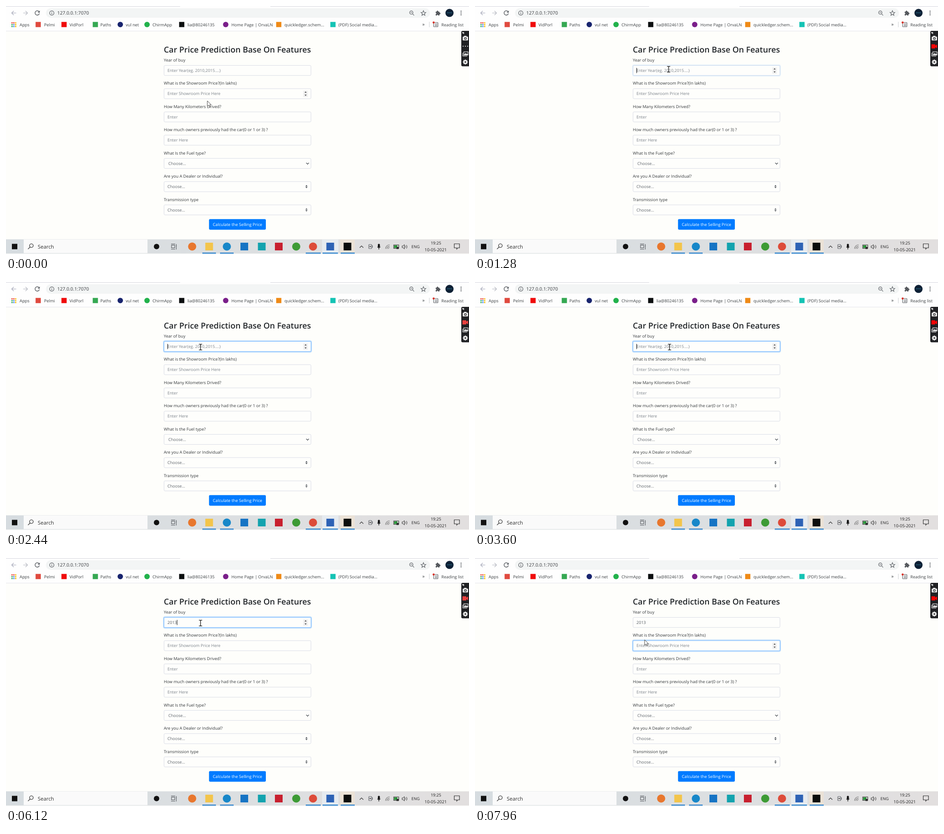
An HTML page that plays this animation: 1021x549 px, repeating every 8 s.

```html
<!DOCTYPE html>
<html lang="en">
<head>
<meta charset="utf-8">
<title>Car price form</title>
<style>
html, body { margin: 0; width: 100%; height: 100%; overflow: hidden; background: #fefefb; }
svg {
  display: block; width: 100%; height: 100%;
  font-family: "Open Sans", "Noto Sans", sans-serif; text-rendering: geometricPrecision;
}
.line { fill: none; stroke: #5f6368; stroke-width: 1.2; }
</style>
</head>
<body>
<svg id="stage" viewBox="0 0 1021 549"></svg>
<script>
const LOOP = 8000;
const STEP = 51.45; // distance between form rows
const FONT = 9.08;

const text = (x, y, size, fill, content, extra = '') =>
  `<text x="${x}" y="${y}" font-size="${size}" fill="${fill}" ${extra}>${content}</text>`;
const rect = (x, y, w, h, fill, extra = '') =>
  `<rect x="${x}" y="${y}" width="${w}" height="${h}" fill="${fill}" ${extra}/>`;
const circle = (x, y, r, fill, extra = '') =>
  `<circle cx="${x}" cy="${y}" r="${r}" fill="${fill}" ${extra}/>`;
const line = (d, extra = '') => `<path class="line" d="${d}" ${extra}/>`;
const shape = (d, fill, extra = '') => `<path d="${d}" fill="${fill}" ${extra}/>`;
const square = (x, y, size, fill) => rect(x - size / 2, y - size / 2, size, size, fill);

function browserBar() {
  const bookmarks = [
    [84, 'Pelmi', 71, '#e04a3f', square],
    [140, 'VidPorl', 128, '#f00a0a', square],
    [208, 'Paths', 197, '#36a853', square],
    [264, 'vul net', 252, '#18246e', circle],
    [323, 'ChirmApp', 311, '#22b24c', circle],
    [400, 'lia@80246135', 387.5, '#0c0f10', square],
    [497, 'Home Page | OrvaLN', 484.5, '#7a1f8a', circle],
    [614, 'quickledger.schem...', 601.5, '#ef8a17', square],
    [733, '(PDF) Social media...', 721, '#14c3b4', square],
  ];
  let out = rect(0, 0, 1021, 55, '#fefefe')
    + rect(0, 0, 384, 1.3, '#dcdde3') + rect(583, 0, 438, 1.3, '#dcdde3')
    + rect(0, 55, 1021, 1, '#e4e4ea')
    + rect(88, 5, 847, 21, '#f3f5f5', 'rx="10.5"');
  out += line('M22.5 15.5H13M17 11l-4.5 4.5 4.5 4.5', 'style="stroke:#a5a8b8"')
    + line('M38 15.5H47.5M43 11l4.5 4.5-4.5 4.5', 'style="stroke:#b4b7c0"')
    + line('M72.8 12.5A4.8 4.8 0 1 0 73.6 16.5', 'style="stroke-width:1.5"')
    + shape('M74.5 10v4.7h-4.7z', '#5f6368')
    + circle(101, 15.5, 4.8, 'none', 'class="line"')
    + rect(100.4, 14.8, 1.2, 3.5, '#5f6368') + rect(100.4, 12.6, 1.2, 1.2, '#5f6368')
    + text(113, 19.3, 10.3, '#33363a', '127.0.0.1:7070');
  out += circle(893.8, 14.5, 3.7, 'none', 'class="line"') + line('M896.5 17.3L900 20.8M892 14.5H895.7');
  const star = Array.from({ length: 10 }, (_, i) => {
    const r = i % 2 ? 2.5 : 5.7, a = i * Math.PI / 5;
    return `${920.5 + r * Math.sin(a)},${16 - r * Math.cos(a)}`;
  });
  out += `<polygon class="line" points="${star.join(' ')}"/>`
    + rect(947.5, 12.5, 8.5, 8.5, '#55585d', 'rx="1"') + circle(951.5, 12, 1.8, '#55585d') + circle(956.3, 16.5, 1.8, '#55585d')
    + circle(947.5, 16.7, 1.4, '#fefefe') + circle(951.7, 21, 1.4, '#fefefe')
    + circle(978, 15.3, 9, '#0d2035') + rect(972, 14, 12, 2, '#1c4a63', 'rx="1"');
  for (const y of [11.5, 15.5, 19.5]) out += circle(1003.5, y, 1.2, '#5f6368');

  const tiles = ['#ea4335', '#ea4335', '#fbbc04', '#34a853', '#4285f4', '#fbbc04', '#34a853', '#4285f4', '#fbbc04'];
  tiles.forEach((fill, i) => out += rect(12 + i % 3 * 4, 36 + (i / 3 | 0) * 4, 2.7, 2.7, fill));
  out += text(30, 44.5, 9.3, '#3c4043', 'Apps');
  for (const [x, name, iconX, fill, mark] of bookmarks)
    out += mark(iconX, 41, mark === circle ? 6 : 11.5, fill) + text(x, 44.5, 9.2, '#3c4043', name);
  out += text(918, 44, 10.5, '#3c4043', '»') + rect(933, 35, 1, 12, '#cfd1d5')
    + rect(943, 36.5, 9.5, 9.5, 'none', 'rx="1" class="line"') + line('M945.8 39.5h5M945.8 42h5M945.8 44h5')
    + circle(943, 36.5, 2.3, '#d93025') + text(960, 44.5, 9.15, '#3c4043', 'Reading list');
  return out;
}

function form() {
  const rows = [
    ['Year of buy', ''],
    ['What is the Showroom Price?(In lakhs)', 'Enter Showroom Price Here'],
    ['How Many Kilometers Drived?', 'Enter'],
    ['How much owners previously had the car(0 or 1 or 3) ?', 'Enter Here'],
    ['What Is the Fuel type?', 'Choose...'],
    ['Are you A Dealer or Individual?', 'Choose...'],
    ['Transmission type', 'Choose...'],
  ];
  let out = text(348, 103.3, 17.86, '#212529', 'Car Price Prediction Base On Features', 'font-weight="600"');
  rows.forEach(([label, hint], i) => {
    const y = i * STEP, mid = 142.7 + y;
    out += text(348, 122.8 + y, FONT, '#33373b', label)
      + (i < 2 ? rect(347.5, 130.4 + y, 326, 24.6, 'none', `id="ring${i}" rx="3" stroke="#007bff" stroke-width="2"`) : '')
      + rect(348.5, 131.5 + y, 324, 22.3, '#fefefc', `id="box${i}" rx="2.4" stroke="#d9dce6"`)
      + text(i === 4 ? 358 : 356, 146 + y, FONT, i < 4 ? '#7b828a' : '#60666d', hint, `id="value${i}"`);
    if (i < 2) out += `<g id="spin${i}">` + rect(655.5, 136 + y, 10, 14, '#efefef')
      + shape(`M658.5 ${mid - 2.2}l2.2-3 2.2 3zM658.5 ${mid + 2}l2.2 3 2.2-3z`, '#505050') + '</g>';
    if (i === 4) out += line(`M662 ${mid - 1.4}l3 3 3-3`, 'style="stroke:#343a40"');
    if (i > 4) out += shape(`M660.2 ${mid - .8}l2.4-2.6 2.4 2.6zM660.2 ${mid + .8}l2.4 2.6 2.4-2.6z`, '#343a40');
  });
  return out + rect(447.7, 471.8, 125.3, 23.4, '#007bff', 'rx="2.4"')
    + text(510.5, 487.1, 9.17, '#fff', 'Calculate the Selling Price', 'text-anchor="middle"')
    + rect(0, 137, 1, 11.5, '#111', 'id="caret"');
}

function taskbar() {
  const apps = [
    [410.5, '#e8772e', circle], [448, '#f3c54b', square], [487, '#1787c9', circle],
    [525.5, '#1674c4', square], [564, '#13a3ae', square], [601.5, '#c8202f', square],
    [640, '#3d9b35', circle], [677, '#dd4b39', circle], [715, '#2d62b5', square], [753, '#0c0e0c', square],
  ];
  let out = `<defs><linearGradient id="bar"><stop stop-color="#d6dce0"/><stop offset=".5" stop-color="#dcdfe1"/>
    <stop offset="1" stop-color="#e2dfdf"/></linearGradient></defs>`
    + rect(0, 516.5, 1021, 31.5, 'url(#bar)') + rect(39, 517, 273, 30, '#fafafa')
    + rect(697, 517, 36, 31, '#e6ebf0') + rect(737, 517, 32, 31, '#ebe2d6')
    + square(19, 532.5, 12, '#111')
    + circle(56, 530.5, 4, 'none', 'class="line" style="stroke:#222"') + line('M53.2 533.5l-4.7 4.7', 'style="stroke:#222"')
    + text(70, 537, 11.4, '#303030', 'Search')
    + circle(332, 532.5, 6, '#111')
    + rect(365, 529.5, 7, 6, 'none', 'class="line"') + line('M364 526.8h9M364 538.5h9M375.5 527v12M374.5 531h2');
  for (const [x, fill, mark] of apps) out += mark(x, 532.5, mark === circle ? 9 : 17, fill);
  for (const [x, w] of [[433, 30], [472, 30], [661, 33], [698, 34], [738, 31]]) out += rect(x, 546, w, 2, '#1976c8');

  out += line('M780 535l4-4 4 4', 'style="stroke:#333"')
    + rect(800, 528, 6.5, 9, 'none', 'rx="1" class="line"') + circle(803.2, 532.5, 1.4, '#444') + line('M808 530v5')
    + rect(820, 526.5, 4.5, 8.5, '#151515', 'rx="2"') + line('M819 533q3.2 5 6.5 0M822.2 536v3', 'style="stroke:#151515"')
    + line('M837 537.5a9 9 0 0 1 9-9M840 537.5a6 6 0 0 1 6-6M843 537.5a3 3 0 0 1 3-3', 'style="stroke:#777"')
    + rect(855, 529, 11, 7.5, '#eee', 'stroke="#333" stroke-width="1.2"') + rect(856, 530, 7, 5.5, '#2c9c3c') + rect(861, 533, 5, 5, '#333')
    + shape('M873.5 531h2l3-2.8v9.6l-3-2.8h-2z', 'none', 'stroke="#333"')
    + line('M880.5 530.5q2 2.3 0 4.7M882.7 529q3.4 4 0 8', 'style="stroke:#333;stroke-width:.9"')
    + text(894, 536.2, 8.9, '#222', 'ENG')
    + text(948, 528.3, 9.1, '#222', '19:25', 'text-anchor="middle"')
    + text(947.5, 543.2, 9.4, '#222', '10-05-2021', 'text-anchor="middle"')
    + line('M988.5 526.5h11.5v9h-4l-2 2.7v-2.7h-5.5z', 'style="stroke:#333"');
  return out;
}

function recorder() {
  const gear = Array.from({ length: 8 }, (_, i) =>
    rect(1011.7, 118.5, 2.4, 3, '#eee', `transform="rotate(${i * 45} 1012.9 124)"`)).join('');
  return rect(1004, 55, 22, 78.5, '#202124', 'rx="3"')
    + shape('M1006 57.5l5 1-1.5 1 1 2-1 .7-1.2-2-1.3 1z', '#eee')
    + rect(1007, 67.8, 12, 8.4, '#e6e6e6', 'rx="1.3"') + rect(1010, 66, 5.5, 3, '#e6e6e6')
    + circle(1013, 72, 2.7, '#202124') + circle(1013, 72, 1.5, '#e6e6e6')
    + '<g id="dots">' + [1008, 1013, 1018].map(x => circle(x, 89, 1.1, '#fff')).join('') + '</g>'
    + shape('M1006.5 84.7h8.5v3l4-2.5v8.3l-4-2.5v3h-8.5z', 'red', 'id="camera"')
    + rect(1009.5, 101.5, 9.5, 7, 'none', 'stroke="#e6e6e6" stroke-width="1.2"')
    + shape('M1010 108l3-4 2 2.2 1.5-1.5 2.2 3.3z', '#e6e6e6')
    + line('M1007.3 103.5v7.2h9.7', 'style="stroke:#e6e6e6"')
    + gear + circle(1012.9, 124, 4.2, '#eee') + circle(1012.9, 124, 1.7, '#202124');
}

function pointers() {
  return `<g id="pointer"><g id="arrow">`
    + shape('M0 0V12.2L2.9 9.6 4.9 14.2 6.9 13.3 4.9 8.9H8.7Z', '#fff', 'stroke="#333" stroke-width=".9"')
    + '</g><g id="beam">'
    + line('M-3.5-6.3h2.5q1 0 1 1v10.6q0 1-1 1h-2.5M3.5-6.3h-2.5q-1 0-1 1M3.5 6.3h-2.5q-1 0-1-1', 'style="stroke:#111;stroke-width:1.3"')
    + '</g></g>';
}

const stage = document.getElementById('stage');
stage.innerHTML = browserBar() + form() + taskbar() + recorder() + pointers();

const el = id => document.getElementById(id);
const show = (id, visible) => el(id).setAttribute('visibility', visible ? 'visible' : 'hidden');
const clamp = v => Math.max(0, Math.min(1, v));
const latest = (events, t) => events.filter(([at]) => at <= t).pop()[1];

const HINT = 'Enter Year(eg. 2010,2015....)';
const typing = [[0, ''], [4320, '1'], [4720, ''], [5000, '2'], [5240, '20'], [5560, '201'], [5840, '2013']];
const path = [
  [0, 444, 210], [80, 444, 210], [640, 428, 139], [1000, 428, 139], [1240, 427, 140], [1760, 427, 140],
  [2200, 429, 144], [6500, 429, 144], [7150, 385, 194], [7440, 385, 194], [7880, 374, 181], [LOOP, 374, 181],
];
const CLICKS = [1240, 7400];

function pointerAt(t) {
  const i = path.findIndex(([at]) => at > t);
  const [t0, x0, y0] = path[i - 1], [t1, x1, y1] = path[i];
  const k = (t - t0) / (t1 - t0), e = k * k * (3 - 2 * k);
  return [x0 + (x1 - x0) * e, y0 + (y1 - y0) * e];
}

// Blends the plain border colour into the focus blue.
const borderColor = k =>
  `rgb(${[[217, 128], [220, 189], [230, 255]].map(([from, to]) => from + (to - from) * k)})`;

function draw(t) {
  const [x, y] = pointerAt(t);
  const over = (i, margin) => Math.abs(y - 142.6 - i * STEP) < 11.5 + margin;
  const focus = t < CLICKS[0] ? -1 : t < CLICKS[1] ? 0 : 1;
  const [first, second] = CLICKS.map(at => clamp((t - at) / 150));
  const fade = [first - second, second];

  el('pointer').setAttribute('transform', `translate(${x} ${y})`);
  const inField = over(0, 0) || over(1, 0);
  show('beam', inField);
  show('arrow', !inField);

  for (const i of [0, 1]) {
    el('ring' + i).setAttribute('opacity', fade[i] * .3);
    el('box' + i).setAttribute('stroke', borderColor(fade[i]));
    show('spin' + i, focus === i || over(i, 5));
  }

  const typed = latest(typing, t), value = el('value0');
  value.textContent = typed || HINT;
  value.setAttribute('fill', typed ? '#555b62' : '#7b828a');

  // The caret restarts its blink on every key press or click.
  const lastKey = typing.filter(([at]) => at && at <= t).pop();
  const blinkStart = focus === 1 ? CLICKS[1] : lastKey ? lastKey[0] : CLICKS[0];
  show('caret', focus >= 0 && (t - blinkStart) % 1040 < 520);
  const caretX = 356 + (focus === 0 && typed ? value.getComputedTextLength() : 0);
  el('caret').setAttribute('transform', `translate(${caretX} ${focus === 1 ? STEP : 0})`);

  const recording = t >= 1080;
  show('dots', !recording);
  show('camera', recording);
  el('camera').setAttribute('fill', t < 2080 || (t + 400) % 1000 < 490 ? '#f60505' : '#e8403f');
}

function frame() {
  draw(performance.now() % LOOP);
  requestAnimationFrame(frame);
}
frame();
</script>
</body>
</html>
```
